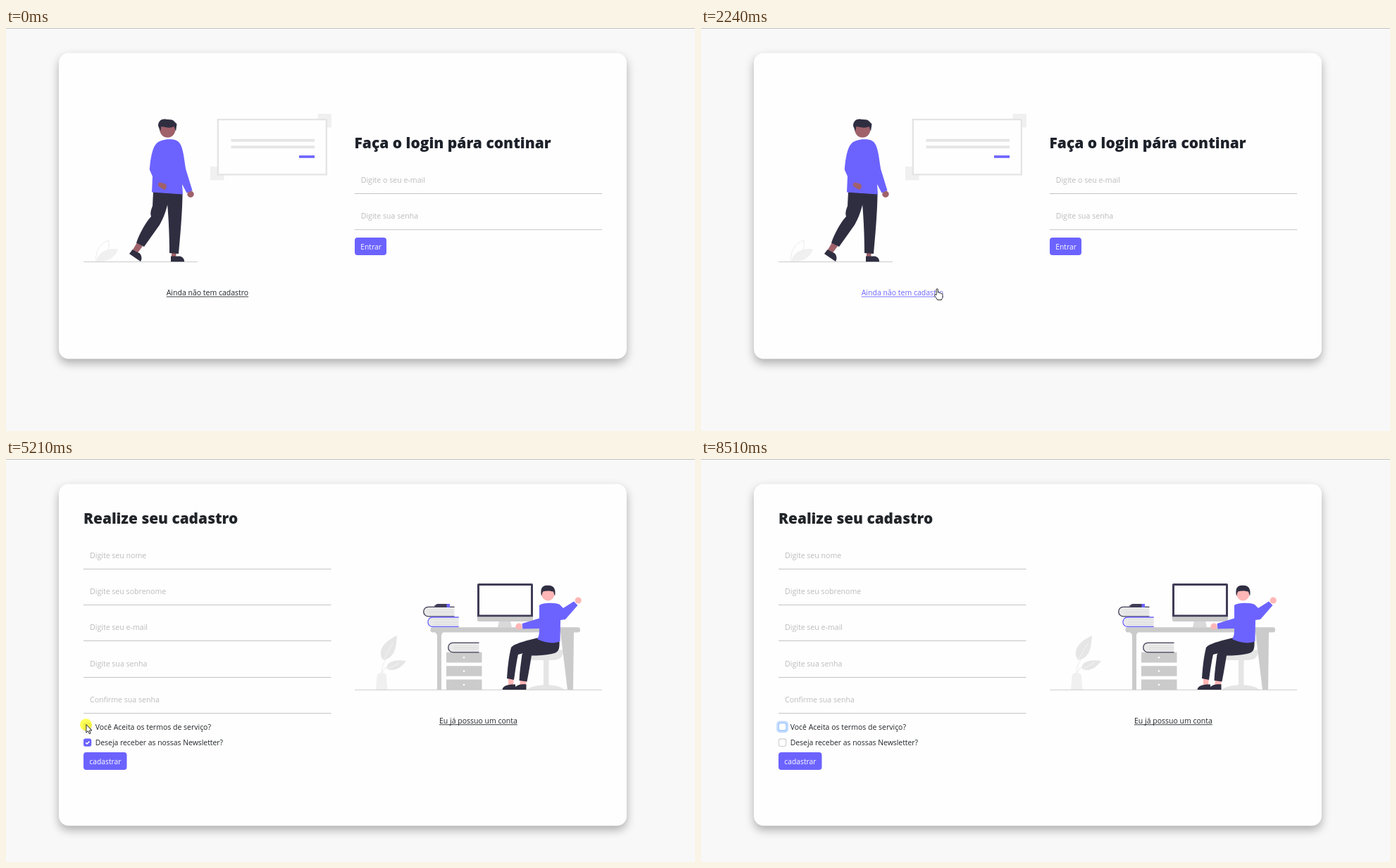
Write an HTML page with a canvas that moves like this. It is 978 by 573 pixels and loops after 9370 ms.

```html
<!DOCTYPE html>
<html lang="pt">
<head>
<meta charset="utf-8">
<title>Login e cadastro</title>
<style>
html, body { margin: 0; width: 100%; height: 100%; overflow: hidden; background: #f8f8f8; }
canvas { display: block; }
</style>
</head>
<body>
<canvas id="stage" width="978" height="573"></canvas>
<script>
const ctx = document.getElementById('stage').getContext('2d');
const LOOP = 9370;
const SANS = '"Open Sans", "Noto Sans", sans-serif';
const PURPLE = '#6c63ff', INK = '#212529', DARK = '#2f2e41', SLATE = '#3f3d56';
const BROWN = '#a0616a', PINK = '#ffb6b6', GREY = '#cbcbcb', PALE = '#e5e5e5', FAINT = '#f0f0f0';

// Pointer bursts: start, end, number of steps
const bursts = [
  [320, 1200, 13], [1280, 2170, 14], [2240, 2790, 9], [4300, 4720, 7],
  [4890, 5550, 9], [5750, 6440, 10], [6900, 7250, 6], [7390, 7540, 3], [7860, 8510, 10]
];
// Pointer path: time, x, y
const path = [
  [320, 929, 561], [560, 835, 470], [800, 735, 405], [1000, 670, 378], [1200, 639, 370],
  [1280, 608, 380], [1350, 555, 384], [1420, 495, 360], [1490, 435, 325], [1560, 395, 304],
  [1622, 371.5, 296.5], [1760, 343, 311], [1900, 328, 337], [2040, 328, 355], [2170, 333, 365],
  [2240, 335, 371], [2790, 332, 373], [4300, 300, 373], [4510, 175, 374], [4720, 111, 375],
  [4890, 114, 380], [5130, 113.5, 377], [5550, 113.5, 377], [5750, 114, 382], [6130, 116.5, 402],
  [6440, 116.5, 402], [6900, 117.5, 398], [7250, 118, 377], [7540, 118, 377],
  [7860, 150, 388], [8438, 813, 548]
];

function snap(t) {
  let held = 0;
  for (const [a, b, n] of bursts) {
    if (t < a) break;
    const d = (b - a) / (n - 1);
    held = Math.min(b, a + Math.floor((t - a) / d + 0.1) * d);
  }
  return held;
}

function pointerAt(t) {
  let i = 0;
  while (i < path.length - 2 && path[i + 1][0] <= t) i++;
  const [t0, x0, y0] = path[i], [t1, x1, y1] = path[i + 1];
  const u = Math.max(0, Math.min(1, (t - t0) / (t1 - t0)));
  return [x0 + (x1 - x0) * u, y0 + (y1 - y0) * u];
}

function rect(x, y, w, h, color, r = 0) {
  ctx.fillStyle = color;
  ctx.beginPath();
  ctx.roundRect(x, y, w, h, r);
  ctx.fill();
}

function disc(x, y, r, color, ry = r) {
  ctx.fillStyle = color;
  ctx.beginPath();
  ctx.ellipse(x, y, r, ry, 0, 0, Math.PI * 2);
  ctx.fill();
}

function fill(d, color) {
  ctx.fillStyle = color;
  ctx.fill(new Path2D(d));
}

function line(d, color, w = 1) {
  ctx.strokeStyle = color;
  ctx.lineWidth = w;
  ctx.stroke(new Path2D(d));
}

function text(s, x, y, color = INK, size = 10.5, weight = 400) {
  ctx.font = `${weight} ${size}px ${SANS}`;
  ctx.fillStyle = color;
  ctx.fillText(s, x, y);
}

function link(s, x, y, color) {
  text(s, x, y, color);
  ctx.fillRect(x, y + 1.3, ctx.measureText(s).width, 0.9);
}

function field(s, x, y) {
  text(s, x + 9, y - 15.2, '#bcbcbc', 10.6);
  rect(x, y, 351.5, 1, '#c4c4c4');
}

function button(s, x, y, w) {
  rect(x, y, w, 25, PURPLE, 4);
  text(s, x + 8.3, y + 16.5, '#fff', 10.3);
}

function panel(h) {
  rect(0, 0, 978, 573, '#f8f8f8');
  rect(0, 0, 978, 1, '#c2c2c2');
  ctx.save();
  ctx.shadowColor = 'rgba(0,0,0,.3)';
  ctx.shadowBlur = 13;
  ctx.shadowOffsetY = 6;
  rect(75, 35.5, 806, h, '#fefefe', 14);
  ctx.restore();
}

function walker() {
  rect(442.5, 122, 19.5, 19.5, FAINT);
  rect(290, 197, 19.5, 19.5, FAINT);
  rect(299.7, 129, 156.3, 80.5, '#e4e4e4');
  rect(302, 131.3, 151.7, 75.9, '#fefefe');
  rect(319.5, 157.7, 118.5, 4, PALE);
  rect(319.5, 167.2, 118.5, 4, PALE);
  rect(416, 181.2, 22, 3.6, PURPLE);

  fill('M128 333C130 318 145 312 159 314.5C155 327 143 333 128 333Z', FAINT);
  line('M128 333C126 318 134 305 146 302C146 308 147 312 144 317', '#ececec');
  rect(110, 332, 162, 1, GREY);

  fill('M186 305L194 310L186 321L179 317Z', BROWN);
  fill('M235 319H242L241 326H235Z', BROWN);
  fill('M179.5 315L190 320.5C193 324 193 329 191 332L175 321Z', DARK);
  fill('M234 324.5H247C251 325.5 253.5 329 253 332.3H234Z', DARK);
  fill('M209 233L250.5 236C250.5 255 248 290 245 321L232 320C232 300 231 272 229 250L222 236Z', DARK);
  fill('M209 233L232 236L229 252C226 264 222 273 218 280L196 311L185 305.5C190 291 198 277 206 268C204 262 207 256 208 253Z', DARK);
  disc(262, 236.2, 4.7, BROWN);
  fill('M221 160C227 157.5 237 158 241 159.5C248 162 250 170 252 180L255 200L264.5 231L256.5 234.5L250 222L251 236.5L207 233.5L208 211L203.8 201.5C205 185 208 170 213 165C215 162 218 161 221 160Z', PURPLE);
  fill('M216 221C219 218 222 221 226 221.5C229 223 228 229 225 230C221 229 219 226 216 225Z', BROWN);
  disc(229.3, 144.5, 11, BROWN, 11.2);
  fill('M219 147L216 139C216 132 221 129 226 129.5C232 131 236 129 239 133L242.5 136.5L241 147L238.5 140C232 143.5 226 140.5 220.5 140Z', DARK);
}

function scanIcon() {
  ctx.save();
  ctx.shadowColor = 'rgba(0,0,0,.18)';
  ctx.shadowBlur = 3;
  disc(447, 136.3, 12, '#fff');
  ctx.restore();
  ctx.lineCap = 'round';
  line('M441.5 134V132.5Q441.5 130.8 443.2 130.8H444.7M449.3 130.8H450.8Q452.5 130.8 452.5 132.5V134M452.5 138.6V140.1Q452.5 141.8 450.8 141.8H449.3M444.7 141.8H443.2Q441.5 141.8 441.5 140.1V138.6', '#2b7cae', 1.3);
  ctx.lineCap = 'butt';
  disc(447, 136.3, 2.1, '#2b7cae');
  disc(447, 136.3, 0.9, '#fff');
}

function book(x, y, color) {
  const cover = `M${x + 44} ${y}H${x + 7}C${x - 2} ${y} ${x - 2} ${y + 13.5} ${x + 7} ${y + 13.5}H${x + 44}`;
  fill(cover, '#e9e9e9');
  for (let i = 1; i < 4; i++) rect(x + 8, y + i * 3.4, 35, 0.6, '#d6d6d6');
  line(cover, color, 1.3);
}

function desk() {
  fill('M525 328L526.5 309C527 302 540 302 540 309L541.5 328Z', FAINT);
  line('M533 304C533 295 536 289 543 279M534 304C535 299 539 296 546 294', FAINT, 1.3);
  fill('M535 286C528 275 532 262 555 251C554 266 553 283 535 286Z', '#e6e6e6');
  fill('M541 299C538 291 548 284 568 287C562 296 552 303 541 299Z', '#e6e6e6');
  line('M535 286L549 262M541 299L558 290', '#f6f6f6', 0.8);

  fill('M742 283C744 278 752 278 760 276L791 271C792 282 785 286 775 286H746Z', PALE);
  rect(763, 284, 7.5, 38, PALE);
  fill('M740 328C747 319 786 319 792 328Z', PALE);
  fill('M787 246H806L805 328H797Z', GREY);
  fill('M608 245H621L618 250V328H612V250Z', GREY);
  for (let i = 0; i < 3; i++) {
    rect(625, 274.8 + i * 19.4, 50.5, 14.6, GREY);
    disc(650, 282.2 + i * 19.4, 1.3, '#fff');
  }
  book(627.5, 261.3, SLATE);
  book(592.5, 210.3, SLATE);
  book(598.7, 225, PURPLE);
  fill('M607.5 209L612 206H626V211H612Z', SLATE);
  rect(625.5, 206, 4.5, 5, PURPLE);

  fill('M700 230H716L718 239.5H698Z', '#d9d9d9');
  rect(669, 177, 79, 54, GREY, 2);
  rect(669, 177, 79, 47.3, SLATE, [2, 2, 0, 0]);
  rect(672, 180, 73, 41.5, '#fefefe');
  rect(602.5, 239.3, 212.5, 7.2, GREY, 3);
  rect(495, 327.7, 351, 1.1, GREY);

  fill('M713 310H721L720 323H713Z', PINK);
  fill('M730 314H739L738 323H729Z', PINK);
  fill('M704.5 328C705 322 714 320 723 320.5V328Z', DARK);
  fill('M721 328C722 322 730 319.5 738.5 320.5V328Z', DARK);
  fill('M756 254C740 258 722 262 717 268C713 284 712 299 711 312L721 314C723 300 725 286 727 278L760 270Z', DARK);
  fill('M756 254L785.5 259C786 272 784 275 775 277C765 279 756 279.5 746 279.5C744 291 742 304 739.5 316.5L728.5 315C729 302 731 290 732.5 278L740 266Z', DARK);
  disc(728, 238, 4.7, PINK, 4.4);
  disc(812.2, 201, 4.6, PINK);
  fill('M757 208C762 204 780 204 786 207L791 212L806 202.5L811.5 208L794 228L787 229L786.5 259C780 263 765 262 754 256C757 251 757 247 757 241L733.5 241.5L732.5 234L757 226.5Z', PURPLE);
  disc(769.3, 191.5, 9.4, PINK, 9.9);
  fill('M760 195C758 184 761 179 769 179.7C778 179 781 186 779 195L777 188.5C771 187 767 187 762 188.5Z', DARK);
}

function checkbox(y, on, focus, pressed) {
  const x = 110, s = 11.2;
  if (focus) rect(x - 2.8, y - 2.8, s + 5.6, s + 5.6, '#c2dbfe', 5);
  const edge = on ? PURPLE : focus ? '#86b7fe' : '#bfbfbf';
  rect(x, y, s, s, edge, 2.8);
  if (!on) rect(x + 0.8, y + 0.8, s - 1.6, s - 1.6, '#fff', 2.1);
  else line(`M${x + 3.2} ${y + 5.7}l1.8 1.7l3.4 -3.4`, '#fff', 1.6);
  if (pressed) rect(x, y, s, s, 'rgba(0,0,0,.1)', 2.8);
}

function login(t) {
  panel(435);
  walker();
  if (t >= 1480 && t < 1890) scanIcon();
  link('Ainda não tem cadastro', 227.7, 380.3, t >= 2240 ? PURPLE : INK);
  text('Faça o login pára continar', 494.5, 171, '#1d212a', 21, 800);
  field('Digite o seu e-mail', 494.7, 235);
  field('Digite sua senha', 494.7, 286.2);
  button('Entrar', 495, 298, 45);
}

function register(t) {
  panel(486);
  text('Realize seu cadastro', 110, 92.3, INK, 20.8, 800);
  ['Digite seu nome', 'Digite seu sobrenome', 'Digite seu e-mail', 'Digite sua senha', 'Confirme sua senha']
    .forEach((s, i) => field(s, 110, Math.round(156 + i * 51.2)));

  const terms = t >= 5270 && t < 7460;
  const news = t < 6300;
  checkbox(375.2, terms, t >= 5270 && t < 6200 || t >= 7460, pressing(t) && t < 6000 || t >= 7380 && t < 7460);
  checkbox(397.6, news, t >= 6200 && t < 7460, false);
  text('Você Aceita os termos de serviço?', 126.7, 384.8, INK, 10.5);
  text('Deseja receber as nossas Newsletter?', 126.7, 407.2, INK, 10.4);
  button('cadastrar', 110, 417, 61.5);
  desk();
  link('Eu já possuo um conta', 615, 376, INK);
}

const pressing = t => [[5125, 5300], [6200, 6370], [7380, 7530]].some(([a, b]) => t >= a && t < b);

function pointer(t) {
  const [x, y] = pointerAt(t);
  if (pressing(t)) disc(x, y + 0.8, 8.5, 'rgba(255,255,0,.66)');
  ctx.save();
  ctx.translate(x, y);
  ctx.lineJoin = 'round';
  const hand = t >= 2240 && t < 4300;
  const d = hand
    ? 'M-1 8V1C-1 -.7 1.3 -.7 1.3 1V5.2C2.6 4.6 3.5 5 3.7 6C4.9 5.4 5.8 6 6 6.9C7.3 6.5 8 7.2 8 8.4V11C8 13.5 6.5 14 6.5 15.6H.5C0 13.5 -2.8 11.3 -3.5 9.6C-4 7.9 -2 7.4 -1 8.8Z'
    : 'M.4 .5V12.1L3 9.7L4.8 13.8L6.6 13L4.9 9H8.4Z';
  fill(d, '#fff');
  line(d, '#111', 0.9);
  ctx.restore();
}

function draw(now) {
  const t = now % LOOP, s = snap(t);
  if (t < 3850) login(s);
  else register(s);
  if (t >= 320 && s < 8500) pointer(s);
}

const start = performance.now();
function tick() {
  draw(performance.now() - start);
  requestAnimationFrame(tick);
}
tick();
</script>
</body>
</html>
```
